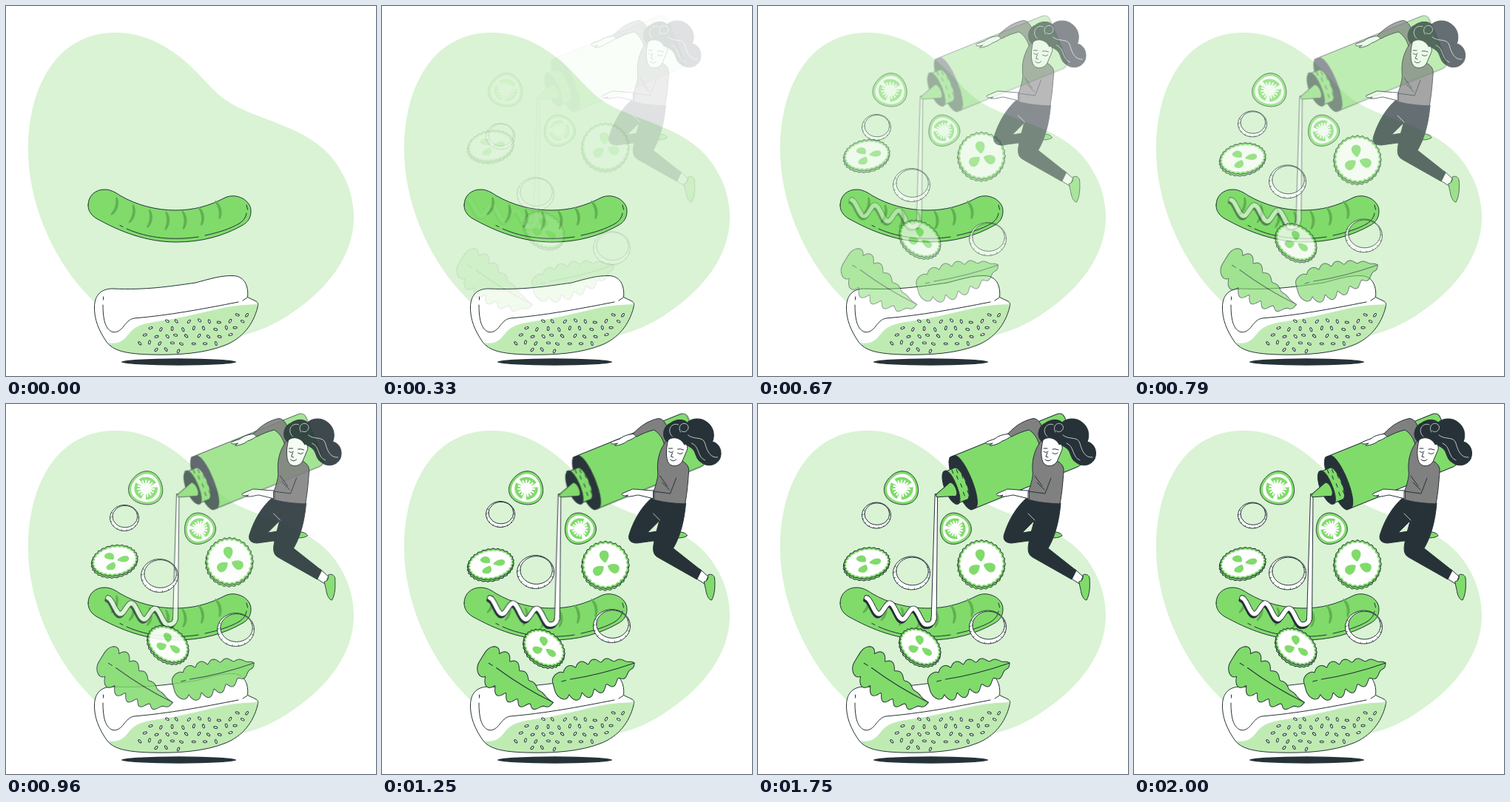
An HTML page for the animation above (2.04 s loop, 500x500 px).

```html
<!DOCTYPE html>
<html lang="en">
<head>
<meta charset="utf-8">
<title>Hot dog</title>
<style>
html, body { margin: 0; width: 100%; height: 100%; overflow: hidden; background: #fff; }
svg { display: block; width: 100%; height: 100%; }
.l, .w, .g, .d, .s { stroke: #263238; stroke-width: 1; stroke-linecap: round; stroke-linejoin: round; }
.l { fill: none; }
.w { fill: #fff; }
.g { fill: #80db6b; }
.d { fill: #263238; }
.s { fill: #808080; }
.gf { fill: #80db6b; }
.hi { fill: none; stroke: #fff; stroke-width: .7; stroke-linecap: round; }
</style>
</head>
<body>
<svg viewBox="0 0 500 500">
  <defs>
    <path id="bun" d="M119.500 406C120 390 129 382 144 382C190 384 220 379 256 374C275 369 290 364 307 364.500C322 365 328 378 326.500 393.500L338 399C341 401 341 403 340 407C334 431 319 449 297 458C268 470 229 472 195 471C162 470 145 466 136 454C125 438 119 423 119.500 406Z"/>
    <clipPath id="bunClip"><use href="#bun"/></clipPath>
    <path id="wave" fill="none" stroke-linecap="round"/>
  </defs>

  <path fill="#d9f3d4" d="M147 36C196 35 236 66 262 94C281 114 292 127 318 139C360 158 400 166 432 196C460 224 470 258 470 286C470 340 430 385 390 412C365 430 342 441 300 450H180C150 430 125 407 105 385C60 335 30 262 30 195C30 105 72 36 147 36Z"/>
  <ellipse cx="233.500" cy="481" rx="77.500" ry="4.700" fill="#263238"/>

  <use href="#bun" fill="#fff"/>
  <path clip-path="url(#bunClip)" fill="#bfebb3" d="M136 455C154 458 160 451 166 443C174 432 186 429 206 426C250 420 286 407 320 404L342 403V475H136Z"/>
  <use href="#bun" class="l"/>
  <path class="l" d="M131.500 393V397M131 404C131 423 134 437 144 440.500C158 443 160 424 173 422C220 418 263 410 314 400M320 398L326 394"/>
  <g id="seeds"></g>

  <g id="leaves"></g>

  <path class="g" d="M111 269C111 256 121 248 133 248C142 248 148 252 154 256C176 269 203 276 229 276C254 276 275 270 296 259C311 252 331 262 331 277C331 286 327 292 320 296C294 311 264 319 230 319C190 319 154 305 122 287C114 282 111 276 111 269Z"/>
  <g id="grill" fill="#62b052"></g>
  <path class="l" d="M154 296.500L158 298.500M163 301C192 314 226 317 260 312M269 310C288 306 303 301 315 294C321 290 324 286 325 280M325 269L326.500 275"/>

  <g data-move="x" data-delay="150">
    <use href="#wave" stroke="#263238" stroke-width="6" transform="translate(-1.500 3)"/>
    <use href="#wave" stroke="#263238" stroke-width="7.500"/>
    <path class="w" d="M238.500 122L233.500 292H240.500L242 122Z"/>
    <use href="#wave" stroke="#fff" stroke-width="5.700"/>
    <g transform="translate(275 107) rotate(-22)">
      <path class="g" d="M0 -38.500H153Q162 -38.500 162 -30V28Q162 38 153 38H0Z"/>
      <path class="d" d="M-2 -38.500H5C17 -32 17 32 5 38H-2C-13 30 -13 -30 -2 -38.500Z"/>
      <path class="g" d="M-13 -23H-1C8 -20 8 20 -1 23H-13Z"/>
      <path class="l" d="M-6 -22V-17M0 -20V-15M-3 -12V-7M4 -11V-6M-2 0V5M5 0V5M-3 12V17M3 12V17"/>
      <path class="d" d="M-17 -24H-14C-6 -18 -6 18 -14 24H-17C-27 18 -27 -18 -17 -24Z"/>
      <path class="g" d="M-38 1L-15 -7C-9 -5 -9 11 -14 13L-38 5Q-40 3 -38 1Z"/>
    </g>
  </g>

  <g id="slices"></g>

  <g data-move="x">
    <path class="g" d="M392 174C401 171 410 174 411 178C405 182 397 181 390 180Z"/>
    <path class="w" d="M366 173L379 174V184L365 185Z"/>
    <path class="d" d="M363 127L390 133L374 157L357 174L371 172L372 184L343 188C334 188 330 183 333 175C339 156 350 138 363 127Z"/>
    <path class="w" d="M421 234L428 223L439 233L435 243Z"/>
    <path class="g" d="M434 240C438 240 440 235 439 231C443 229 447 231 448 235C449 247 448 258 444 265C440 265 437 258 436 251Z"/>
    <path class="d" d="M374 130L409 134C407 157 402 178 392 195L430 225L424 237L371 207C364 203 364 195 367 183C369 170 374 160 374 150Z"/>
    <path class="hi" d="M365 148L374 157"/>

    <path class="w" d="M341 40C333 41 326 42 320 47L309 51C306 54 311 55 317 53L313 56C315 57 326 54 330 50C334 49 339 46 343 43Z"/>
    <path class="s" d="M338 40C350 27 361 22 372 19.500C380 20 384 29 387 42L380 55C378 47 373 39 366 35C358 37 350 40 343 44Z"/>
    <path class="s" d="M384 48C374 60 370 75 371 89C372 98 370 103 368 111L362 128C376 133 391 134 408 135C411 120 412 104 413 92C414 85 410 80 404 77Z"/>
    <path class="w" d="M366 117C356 117 345 115 337 115L323 121C321 124 327 125 331 123L328 125C335 126 341 123 345 123L366 128Z"/>
    <path class="l" d="M396 100L388 121L365 118V127M374 97L384 111M377 106L387 116"/>

    <path class="d" d="M384 51C375 45 379 29 388 26C396 20 406 20 411 25C417 19 429 18 437 24C446 30 449 41 445 51C455 53 459 65 455 74C450 84 437 85 430 79C421 74 424 64 416 59C411 55 406 55 403 57Z"/>
    <path class="w" d="M385 49C382 62 382 74 386 80C391 86 400 84 404 78L410 64C413 58 410 53 407 55C404 47 392 42 385 49Z"/>
    <path class="l" d="M386 64Q389 67 392 64M398 66Q402 69 405 66M386 60H391M398 61Q402 60 406 62M391 66L389 71L392 72M388 75Q392 79 396 75"/>
    <path class="hi" d="M391 44C382 36 390 24 399 28M402 38C397 30 405 23 411 28C416 34 407 41 403 36M412 42C420 49 432 43 435 53C438 65 443 73 452 72M417 53C428 57 424 72 435 76"/>
  </g>
</svg>
<script>
const $ = id => document.getElementById(id);
const TAU = 2 * Math.PI;
const LOOP = 2040, BLANK = 170, DURATION = 1650, SHIFT = 30;

const range = n => Array.from({ length: n }, (_, i) => i);
const line = points => 'M' + points.map(p => p.map(v => v.toFixed(2))).join('L');
// Outline around the origin whose radius varies with the angle.
const polar = (rx, ry, wobble) => line(range(168).map(i => {
  const a = i / 168 * TAU, k = wobble(a);
  return [rx * k * Math.cos(a), ry * k * Math.sin(a)];
})) + 'Z';

let seed = 7;
const random = () => (seed = seed * 16807 % 2147483647) / 2147483647;

// Staggered seeds within the green part of the bun.
function seeds() {
  let out = '';
  for (let row = 0; row < 6; row++) {
    for (let x = 166 + row % 2 * 7; x < 336; x += 14.5) {
      const sx = x + random() * 4 - 2, sy = 415 + row * 9.7 + random() * 3;
      const top = 427 - .11 * (sx - 205) + Math.max(0, 205 - sx) * .55;
      const inside = ((sx - 228) / 108) ** 2 + ((sy - 405) / 62) ** 2 < 1;
      if (sy > top && inside) {
        out += `<ellipse class="w" rx="2.6" ry="1.3" transform="translate(${sx} ${sy}) rotate(${random() * 180})"/>`;
      }
    }
  }
  return out;
}

const grill = () => range(7).map(i => {
  const x = 148 + 23.3 * i, y = 290 - .0035 * (x - 222) ** 2;
  return `<path transform="translate(${x} ${y}) rotate(${16 - 5 * i})" d="M-2 -13C5 -7 5 7 -2 13Q-4 13 -3 10C0 4 0 -4 -3 -11Z"/>`;
}).join('');

// A leaf side is wide * t^rise * (1 - t)^fall, cut into rounded lobes.
function leaf(x, y, length, tilt, upper, lower) {
  const edge = (sign, { wide, rise, fall }) => range(91).map(i => {
    const t = i / 90, phase = TAU * 6.5 * t;
    const width = wide * t ** rise * (1 - t) ** fall * (1 - .17 * Math.cos(phase));
    return [length * t - 2.5 * Math.sin(phase) * (1 - t), sign * width];
  });
  const outline = line([...edge(-1, upper), ...edge(1, lower).reverse()]) + 'Z';
  return `<g data-move="x" data-delay="50"><g transform="translate(${x} ${y}) rotate(${tilt})">
    <path class="g" d="${outline}"/>
    <path class="l" d="M12 0H18M24 0Q${length * .6} 4 ${length} 0"/></g></g>`;
}

// Sauce zigzag, ending in a hook that meets the stream.
const wave = () => line(range(61).map(i => {
  const t = i / 60;
  return [146 + 80 * t, 271 + 18 * t - 9 * Math.cos(5 * Math.PI * t)];
})) + 'Q237 299 237 288';

function tomato(x, y, rx, ry, turn) {
  const blob = inset => polar(rx - inset, ry - inset, a => 1 + .04 * Math.cos(3 * a - turn));
  const at = (r, a) => [(rx - 4) * r * Math.cos(a), (ry - 4) * r * Math.sin(a)];
  const pulp = range(3).map(k => {
    const mid = (turn + TAU * k) / 3, arc = range(13).map(i => mid + (i / 6 - 1) * .85);
    const sac = line([...arc.map(a => at(.83, a)), ...arc.reverse().map(a => at(.4, a))]) + 'Z';
    const pips = range(4).map(i => mid + (i - 1.5) * .42).map(a => line([at(.36, a), at(.58, a)])).join('');
    return `<path class="gf" d="${sac}"/><path d="${pips}" fill="none" stroke="#fff" stroke-width="2.2" stroke-linecap="round"/>`;
  }).join('');
  return `<g data-move="x" data-delay="50"><g transform="translate(${x} ${y})">
    <path class="g" d="${blob(0)}"/><path fill="#fff" d="${blob(3.5)}"/>${pulp}</g></g>`;
}

function cucumber(x, y, rx, ry, tilt, spin) {
  const scallop = inset => polar(rx - inset, ry - inset, a => 1 + .025 * Math.cos(28 * a));
  const petals = range(3).map(k =>
    `<path class="gf" transform="rotate(${spin + 120 * k})" d="M0 -3C-9 -10 -8 -20 0 -20S9 -10 0 -3Z"/>`).join('');
  return `<g data-move="y" data-from="-1"><g transform="translate(${x} ${y}) rotate(${tilt})">
    <path class="g" d="${scallop(0)}" transform="rotate(${-tilt}) translate(-.5 2.5) rotate(${tilt})"/>
    <path class="g" d="${scallop(0)}"/><path fill="#fff" d="${scallop(2.7)}"/>
    <g transform="scale(${rx / 32} ${ry / 32})">${petals}</g></g></g>`;
}

function onion(x, y, rx, ry) {
  const ring = (cx, cy, a, b) => `M${cx - a} ${cy}a${a} ${b} 0 1 0 ${2 * a} 0a${a} ${b} 0 1 0 ${-2 * a} 0Z`;
  const ticks = range(12).map(i => i * .36 - .4).map(a =>
    line([1, .92].map(k => [rx * k * Math.cos(a), ry * k * Math.sin(a)]))).join('');
  return `<g data-move="y" data-from="1"><g transform="translate(${x} ${y})">
    <path class="w" fill-rule="evenodd" d="${ring(0, 0, rx, ry)}${ring(.04 * rx, -.11 * ry, .87 * rx, .84 * ry)}"/>
    <path class="l" style="stroke-width:.7" d="${ticks}"/></g></g>`;
}

$('seeds').innerHTML = seeds();
$('grill').innerHTML = grill();
$('wave').setAttribute('d', wave());
$('leaves').innerHTML =
  leaf(133, 344, 114, 31.4, { wide: 50, rise: .3, fall: 1.5 }, { wide: 50, rise: .4, fall: .5 }) +
  leaf(230, 378, 113.5, -14.3, { wide: 40, rise: .5, fall: .8 }, { wide: 46, rise: .3, fall: .6 });
$('slices').innerHTML =
  tomato(194, 114, 23, 22.5, 2.2) + tomato(266.5, 168.5, 21, 21, .3) +
  onion(160, 150.5, 19.5, 17.5) + cucumber(147, 215, 31, 20.5, -10, -30) +
  onion(207.5, 228.5, 25, 22.5) + cucumber(302, 216, 31.5, 31.5, 0, -8) +
  cucumber(219, 328, 30, 22, 35, -30) + onion(310.5, 301.5, 25, 22.5);

// cubic-bezier(.36, -.01, .5, 1.38)
function ease(x) {
  if (x <= 0) return 0;
  if (x >= 1) return 1;
  const curve = (s, p, q) => 3 * (1 - s) ** 2 * s * p + 3 * (1 - s) * s * s * q + s ** 3;
  let lo = 0, hi = 1;
  for (let i = 0; i < 30; i++) {
    const mid = (lo + hi) / 2;
    if (curve(mid, .36, .5) < x) lo = mid; else hi = mid;
  }
  return curve(lo, -.01, 1.38);
}

const movers = [...document.querySelectorAll('[data-move]')];
function draw(t) {
  for (const el of movers) {
    const { move, from = -1, delay = 0 } = el.dataset;
    const p = t < BLANK ? 0 : ease((t - delay) / DURATION);
    const shift = from * SHIFT * (1 - p);
    el.setAttribute('transform', move === 'x' ? `translate(${shift} 0)` : `translate(0 ${shift})`);
    el.setAttribute('opacity', Math.min(1, Math.max(0, p)));
  }
}
const begin = performance.now();
function frame() {
  draw((performance.now() - begin) % LOOP);
  requestAnimationFrame(frame);
}
draw(0);
requestAnimationFrame(frame);
</script>
</body>
</html>
```
